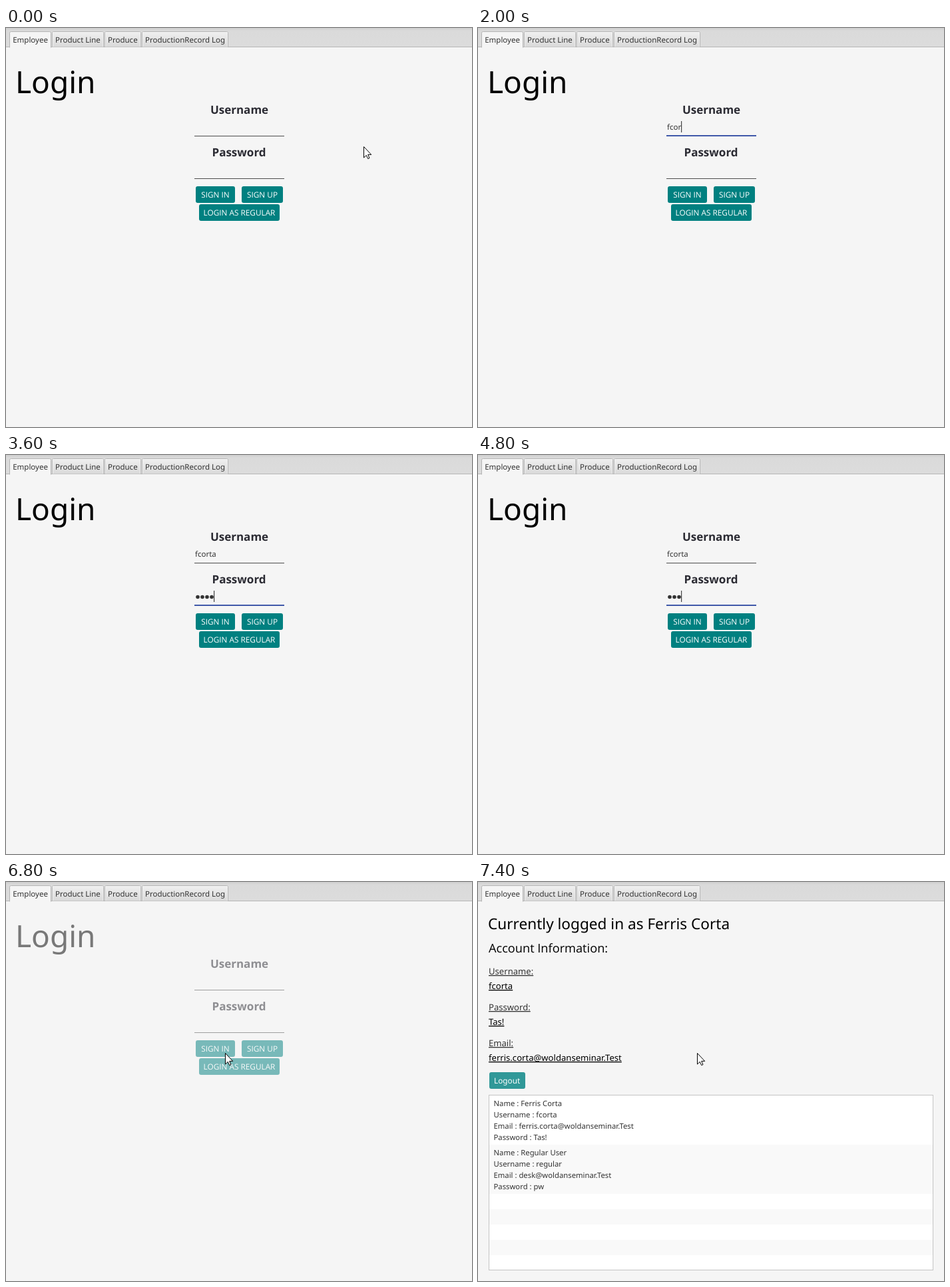
Write an HTML page that moves like this. It is 700 by 600 pixels and loops after 8 s.

```html
<!DOCTYPE html>
<html lang="en">
<head>
<meta charset="utf-8">
<title>Login</title>
<style>
  html, body { margin: 0; width: 100%; height: 100%; overflow: hidden; background: #f5f5f5; }
  svg { display: block; width: 700px; height: 600px; }
  text { font-family: "Noto Sans", "Open Sans", sans-serif; font-size: 11.5px; fill: #333; text-rendering: geometricPrecision; }
  .caps { font-family: "Open Sans", "Noto Sans", sans-serif; font-size: 11.8px; fill: #fff; }
  .label { font-size: 17px; font-weight: 700; fill: #2b2b33; text-anchor: middle; }
  .info { font-size: 13.1px; text-decoration: underline; }
  .value { fill: #000; }
  .row { font-size: 11.3px; }
</style>
</head>
<body>
<svg viewBox="0 0 700 600">
  <defs>
    <linearGradient id="bar" x2="0" y2="1">
      <stop offset="0" stop-color="#cfcfcf"/><stop offset=".15" stop-color="#dadada"/><stop offset="1" stop-color="#dcdcdc"/>
    </linearGradient>
    <linearGradient id="tab" x2="0" y2="1">
      <stop offset="0" stop-color="#f0f0f0"/><stop offset="1" stop-color="#d9d9d9"/>
    </linearGradient>
  </defs>
  <rect width="700" height="600" fill="#f5f5f5"/>
  <rect width="700" height="28" fill="url(#bar)"/>
  <rect y="28" width="700" height="1" fill="#b5b5b5"/>
  <g id="tabs"></g>

  <g id="login">
    <text x="14" y="98" style="font-size:46px;fill:#000">Login</text>
    <text class="label" x="350.5" y="129">Username</text>
    <text class="label" x="350" y="193">Password</text>
    <rect x="283" y="162" width="135" height="1" fill="#4d4d4d"/>
    <rect x="283" y="226" width="135" height="1" fill="#4d4d4d"/>
    <rect id="focus" height="2" fill="#4059a9"/>
    <text id="user" x="284" y="153"></text>
    <g id="dots" fill="#333"></g>
    <rect id="caret" width="1.1" height="17" fill="#333"/>
    <g id="buttons"></g>
  </g>

  <g id="account">
    <text x="15" y="71" style="font-size:22.6px;fill:#000">Currently logged in as Ferris Corta</text>
    <text class="caps" x="16" y="106" style="font-size:18.2px;fill:#000">Account Information:</text>
    <g id="info"></g>
    <rect id="logout" x="17" y="286" width="54" height="25" rx="3"/>
    <text x="24" y="303" style="font-size:11.8px;fill:#fff">Logout</text>
    <g id="list"></g>
  </g>

  <path id="pointer" d="M.5 .5V17L4.3 13.4 6.7 18.6 9 17.6 6.7 12.4H11.7Z" fill="#fff" stroke="#000"/>
</svg>
<script>
const LOOP = 8000, STEP = 200;
const NAME = "fcorta";
const MAIL = "ferris.corta@woldanseminar.Test";
const $ = id => document.getElementById(id);

function add(parent, tag, attrs, content) {
  const el = document.createElementNS("http://www.w3.org/2000/svg", tag);
  set(el, attrs);
  if (content) el.textContent = content;
  parent.appendChild(el);
  return el;
}

function set(el, attrs) {
  for (const key in attrs) el.setAttribute(key, attrs[key]);
}

function show(el, on) {
  el.style.display = on ? "" : "none";
}

function buildTabs() {
  const tabs = [["Employee", 5, 63], ["Product Line", 69, 78], ["Produce", 148, 55], ["ProductionRecord Log", 204, 130]];
  tabs.forEach(([label, x, w], i) => {
    const bottom = i ? 28.5 : 29.5;
    const d = `M${x + .5} ${bottom}V7.5q0-2 2-2H${x + w - 2.5}q2 0 2 2V${bottom}`;
    add($("tabs"), "path", { d, fill: i ? "url(#tab)" : "#f5f5f5", stroke: "#b5b5b5" });
    if (i) add($("tabs"), "path", { d: `M${x + 1.5} 28V6.5H${x + w - 1.5}V28`, fill: "none", stroke: "#f6f6f6", "stroke-opacity": .7 });
    add($("tabs"), "text", { x: x + (i ? 5 : 5.2), y: 22 }, label);
  });
  add($("tabs"), "rect", { x: 6, y: 28, width: 61, height: 2, fill: "#f5f5f5" });
}

function buildButtons() {
  const buttons = [["SIGN IN", 285, 238, 59], ["SIGN UP", 354, 238, 62], ["LOGIN AS REGULAR", 290, 265, 121]];
  for (const [label, x, y, width] of buttons) {
    add($("buttons"), "rect", { x, y, width, height: 25, rx: 3, fill: "#008080" });
    add($("buttons"), "text", { class: "caps", x: x + width / 2, y: y + 17, "text-anchor": "middle" }, label);
  }
}

function buildAccount() {
  const info = [["Username:", NAME], ["Password:", "Tas!"], ["Email:", MAIL]];
  info.forEach(([label, value], i) => {
    add($("info"), "text", { class: "info", x: 16, y: 139 + 54 * i }, label);
    add($("info"), "text", { class: "info value", x: 16, y: 161 + 54 * i }, value);
  });

  const list = $("list");
  add(list, "rect", { x: 16.5, y: 320.5, width: 667, height: 263, fill: "#fff", stroke: "#c4c4c4" });
  for (const [y, height] of [[395, 74], [492, 23], [538, 23]])
    add(list, "rect", { x: 17, y, width: 666, height, fill: "#f9f9f9" });
  const people = [
    ["Ferris Corta", NAME, MAIL, "Tas!"],
    ["Regular User", "regular", "desk@woldanseminar.Test", "pw"]
  ];
  const keys = ["Name", "Username", "Email", "Password"];
  people.forEach((person, p) => person.forEach((value, i) =>
    add(list, "text", { class: "row", x: 23.5, y: 337 + 74 * p + 17 * i }, `${keys[i]} : ${value}`)));
}

function typedCount(t) {
  if (t < 1200 || t >= 6800) return 0;
  return t < 1600 ? 1 : Math.min(NAME.length, 2 + (t - 1600) / STEP);
}

function dotCount(t) {
  if (t < 2800 || t >= 6800) return 0;
  if (t < 3600) return Math.min(3, 1 + (t - 2800) / STEP);
  return t >= 4800 && t < 5600 ? 3 : 4;
}

function pointerAt(t) {
  if (t < 600) {
    const k = t / 400;
    return [537 - 165 * k, 178 - 26 * k];
  }
  if (t < 6200) return null;
  const k = Math.min(1, (t - 6200) / 400);
  const e = 1 - (1 - k) ** 1.3;
  return [442 - 113 * e, 283 - 26 * e];
}

const between = (t, a, b) => t >= a && t < b;

function render(time) {
  const t = Math.floor(time / STEP) * STEP;
  const loggedIn = t >= 7200;
  show($("login"), !loggedIn);
  show($("account"), loggedIn);
  $("login").setAttribute("opacity", t < 6800 ? 1 : Math.max(0, (7027 - t) / 450));
  $("logout").setAttribute("fill", t < 7400 ? "#008080" : "#309898");

  const inUser = between(t, 600, 2600);
  const dots = dotCount(t);
  $("user").textContent = NAME.slice(0, typedCount(t));
  [...$("dots").children].forEach((dot, i) => show(dot, i < dots));

  const width = t === 600 ? 80 : 135;
  show($("focus"), between(t, 600, 6800));
  set($("focus"), { x: 350.5 - width / 2, y: inUser ? 161 : 225, width });

  show($("caret"), inUser || between(t, 2600, 4200) || between(t, 4600, 5200) || between(t, 5600, 6200));
  const typed = inUser && !loggedIn ? Math.round($("user").getComputedTextLength()) : 7 * dots;
  set($("caret"), { x: 284.1 + typed, y: inUser ? 140 : 204 });

  const at = pointerAt(t);
  show($("pointer"), at);
  if (at) $("pointer").setAttribute("transform", `translate(${at.map(Math.round)})`);
}

buildTabs();
buildButtons();
buildAccount();
for (let i = 0; i < 4; i++) add($("dots"), "circle", { cx: 288 + 7 * i, cy: 213.5, r: 2.8 });

const start = performance.now();
function tick() {
  render((performance.now() - start) % LOOP);
  requestAnimationFrame(tick);
}
tick();
</script>
</body>
</html>
```
